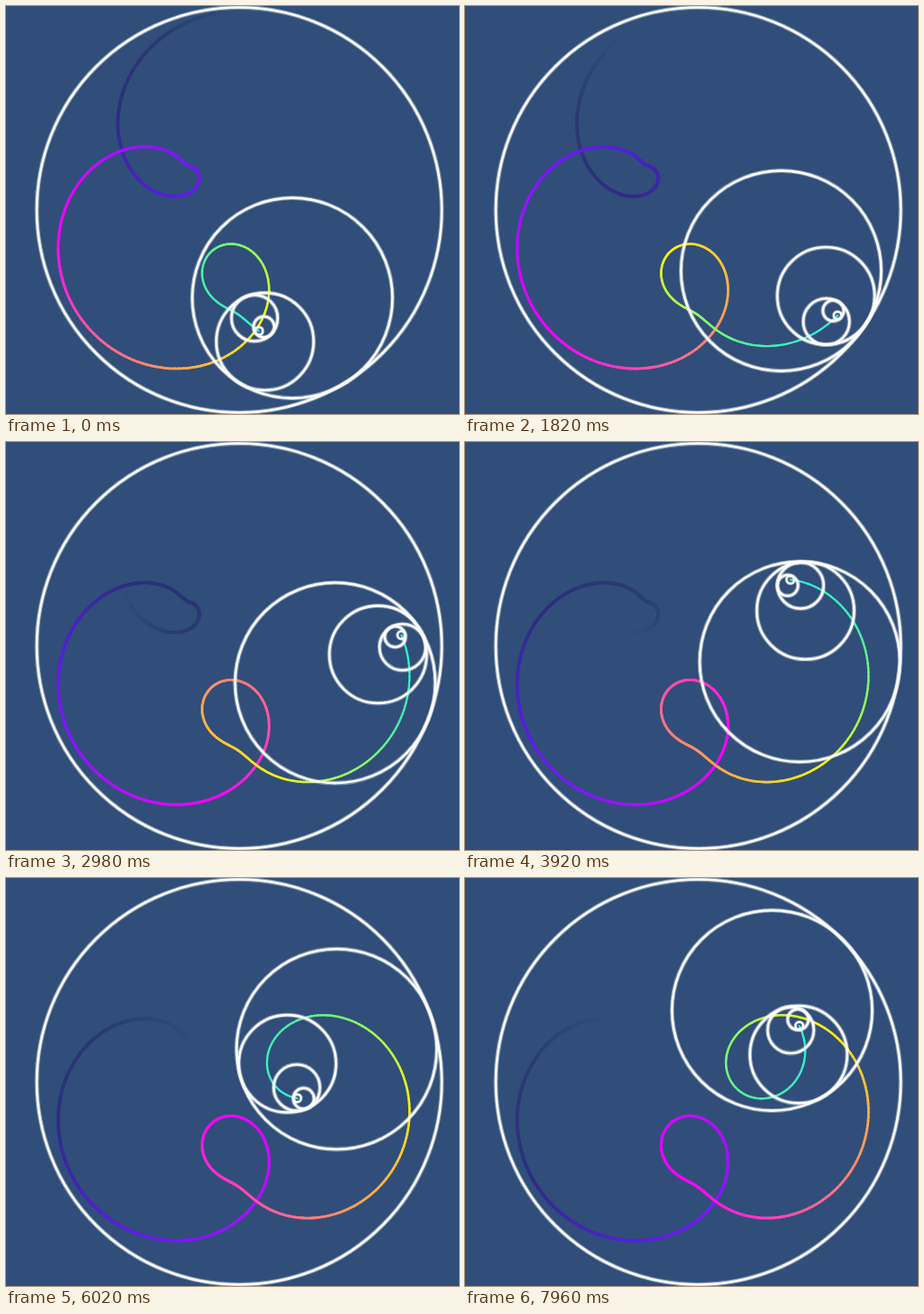
These frames come from a looping animation (500 px wide and 450 px high, 8000 ms). An HTML page with a canvas:

```html
<!DOCTYPE html>
<html lang="en">
<head>
<meta charset="utf-8">
<title>Nested circles</title>
<style>
  html, body { margin: 0; width: 100%; height: 100%; overflow: hidden; background: #304e79; }
  canvas { display: block; }
</style>
</head>
<body>
<canvas id="stage" width="500" height="450"></canvas>
<script>
const ctx = document.getElementById('stage').getContext('2d');
const LOOP = 8000;
const CENTER = [257.5, 225];
const ROOT_RADIUS = 223.5;

// Each circle turns inside its parent: offset, radius, start angle and degrees per step.
const ARMS = [
  { offset: 113.4, radius: 110.5, angle: 58.9, speed: 1.017 },
  { offset: 56.7, radius: 53.7, angle: 122.2, speed: 4.18 },
  { offset: 28.3, radius: 25.5, angle: 246, speed: 7.05 },
  { offset: 14.2, radius: 11.5, angle: 43.3, speed: 4.53 },
  { offset: 7.1, radius: 4.3, angle: 141, speed: 4.17 }
];

const TRAIL_START = -207.6;
const TRAIL_LIFE = 221;
const TRAIL_STEP = 0.5;

// Position along the trail, then red, green, blue.
const GRADIENT = [
  [0, 45, 240, 215],
  [0.08, 75, 236, 170],
  [0.13, 130, 250, 110],
  [0.22, 250, 240, 15],
  [0.33, 255, 150, 95],
  [0.5, 255, 0, 255],
  [0.66, 130, 22, 255],
  [0.74, 84, 30, 220],
  [0.83, 46, 44, 130],
  [0.92, 42, 58, 112],
  [1, 48, 78, 121]
];

function gradientColor(s) {
  let i = 1;
  while (i < GRADIENT.length - 1 && s > GRADIENT[i][0]) i++;
  const a = GRADIENT[i - 1], b = GRADIENT[i];
  const k = (s - a[0]) / (b[0] - a[0]);
  const [r, g, bl] = [1, 2, 3].map(c => Math.round(a[c] + (b[c] - a[c]) * k));
  return `rgb(${r},${g},${bl})`;
}

function centersAt(u) {
  let [x, y] = CENTER;
  return ARMS.map(arm => {
    const a = (arm.angle - arm.speed * u) * Math.PI / 180;
    x += arm.offset * Math.cos(a);
    y += arm.offset * Math.sin(a);
    return [x, y];
  });
}

const penAt = u => centersAt(u)[ARMS.length - 1];

function drawTrail(u) {
  const end = Math.max(TRAIL_START, u - TRAIL_LIFE);
  const points = [penAt(u)];
  const lengths = [0];
  for (let v = u; v > end;) {
    v = Math.max(end, v - TRAIL_STEP);
    const p = penAt(v), q = points[points.length - 1];
    lengths.push(lengths[lengths.length - 1] + Math.hypot(p[0] - q[0], p[1] - q[1]));
    points.push(p);
  }
  const total = lengths[lengths.length - 1];
  ctx.lineCap = 'round';
  for (let i = points.length - 1; i > 0; i--) {
    const s = (lengths[i] + lengths[i - 1]) / 2 / total;
    ctx.strokeStyle = gradientColor(s);
    ctx.lineWidth = 2.2 + 1.8 * s;
    ctx.beginPath();
    ctx.moveTo(...points[i]);
    ctx.lineTo(...points[i - 1]);
    ctx.stroke();
  }
}

// A wide faint stroke under a solid core gives the soft edge.
function drawCircle([x, y], radius) {
  ctx.beginPath();
  ctx.arc(x, y, radius, 0, Math.PI * 2);
  const small = radius < 6;
  ctx.strokeStyle = 'rgba(255,255,255,0.4)';
  ctx.lineWidth = small ? 3.8 : 4.8;
  ctx.stroke();
  ctx.strokeStyle = '#fff';
  ctx.lineWidth = small ? 2.2 : 2.6;
  ctx.stroke();
}

function phaseAt(t) {
  return t < 120 ? 0 : Math.floor((t - 108) / 77.6) + 0.25;
}

function render(t) {
  const u = phaseAt(t);
  ctx.fillStyle = '#304e79';
  ctx.fillRect(0, 0, 500, 450);
  drawTrail(u);
  drawCircle(CENTER, ROOT_RADIUS);
  centersAt(u).forEach((c, i) => drawCircle(c, ARMS[i].radius));
}

const start = performance.now();
function frame() {
  render((performance.now() - start) % LOOP);
  requestAnimationFrame(frame);
}
frame();
</script>
</body>
</html>
```
